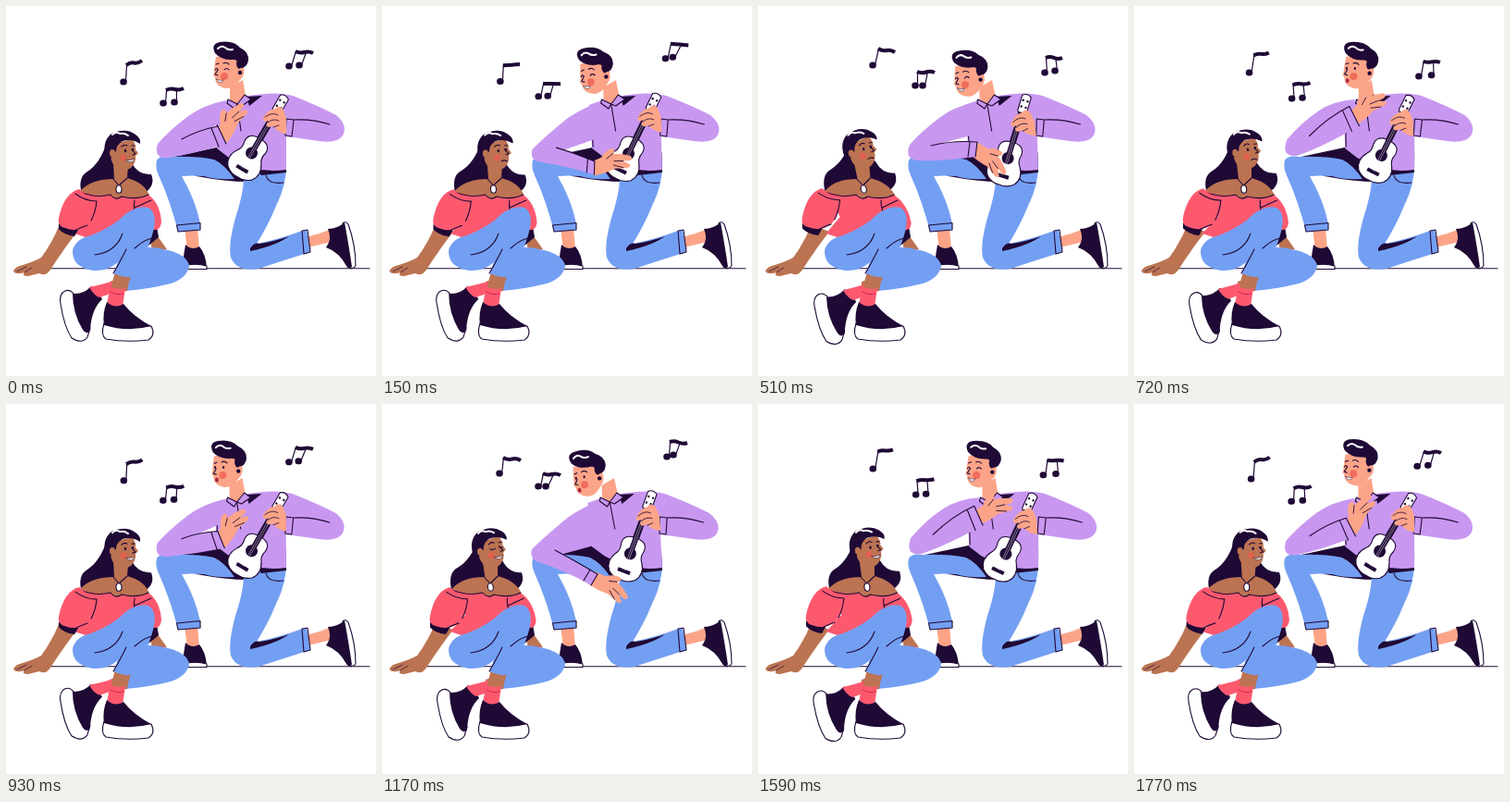
These frames come from a looping animation (400 px wide and 400 px high, 1800 ms). An HTML page:

```html
<!DOCTYPE html>
<html lang="en">
<head>
<meta charset="utf-8">
<title>Serenade</title>
<style>
  html, body { margin: 0; width: 100%; height: 100%; overflow: hidden; background: #fff; }
  svg { display: block; width: 100vw; height: 100vh; }
  .ink { fill: #1f0935; }
  .jean { fill: #739ff3; }
  .shirt { fill: #c898f0; }
  .top { fill: #fc596f; }
  .pale { fill: #fca488; }
  .tan { fill: #bb7352; }
  .white { fill: #fff; }
  .blush { fill: #ee5a4e; opacity: .75; }
  .line { fill: none; stroke: #1f0935; stroke-width: 1.1; stroke-linecap: round; stroke-linejoin: round; }
  .edge { stroke: #1f0935; stroke-width: 1.1; stroke-linejoin: round; }
  .shine { fill: none; stroke: #fff; stroke-width: 2; stroke-linecap: round; stroke-linejoin: round; }
</style>
</head>
<body>
<svg viewBox="0 0 400 400">
  <path class="line" d="M42 283.8H393"/>

  <!-- man: legs -->
  <path class="pale" d="M193 240L207 239L209 264L196 264Z"/>
  <path class="ink" d="M194 258Q201 265 209 260Q216 268 217 283L190 283Z"/>
  <path class="white edge" d="M196 280Q207 278 217 281L217 284.500H197Z"/>
  <path class="pale" d="M324 250Q338 247 352 241L358 254Q345 256 327 261Z"/>
  <path class="white edge" d="M364 235Q367 232 370 236Q378 258 378 281Q375 285 371 283Z"/>
  <path class="ink" d="M348 241Q358 241 366 234Q370 255 374 282Q370 285 368 281Q360 266 346 261Q353 252 348 241Z"/>
  <path class="ink" d="M176 164L232 152L258 170L262 190Q238 190 206 184Z"/>
  <path class="jean" d="M163 167Q166 161 178 163Q206 162 225 166Q236 171 247 187Q228 188 214 184Q199 183 190 184Q205 210 210 235V242L186 244Q178 212 165 183Q161 174 163 167Z"/>
  <path class="line" d="M184.500 237L210 234.500V242L186 244Z"/>
  <path class="jean" d="M246 164L303 172Q303 194 292 216Q283 238 271 257Q296 252 320 243L325 242L329 266Q300 275 273 284Q250 288 243 272Q240 258 248 229Q256 205 257 188Z"/>
  <path class="ink" d="M264 262Q269 255 274 257Q292 254 306 249Q292 259 264 265Z"/>
  <path class="line" d="M320 243L326 242L329 266L322 268ZM281 183Q283 193 300 191"/>

  <!-- man: torso and fretting arm -->
  <g id="chest">
    <path class="ink" d="M270 176L303 158L303 180L276 183Z"/>
    <path class="shirt" d="M240 102L262 97Q292 92 310 97Q338 108 357 118Q370 129 364 140Q358 149 338 146L303 141L303 177Q270 182 241 164L228 154L226 107Z"/>
    <path class="ink" d="M260 98L277 97L263 108Z"/>
    <path class="line" d="M303 122L302 140L309 141L311 123ZM311 123Q332 122 350 128M250 106L254 135M228 112L229 152"/>
    <path class="pale" d="M242 88L256 80L259 97L250 107L242 101Z" id="neck"/>
    <path class="shirt edge" d="M240 101L250 106L247 111L239 105ZM250 106L258 96L265 101L255 108Z"/>
  </g>

  <g id="guitar">
    <path class="white edge" d="M-3 -32V-64L-5 -67L-5 -84Q0 -88 5 -84L5 -67L3 -64V-32Q14 -31 13 -21Q11 -14 15 -9Q22 2 15 11Q8 17 0 16Q-8 17 -15 11Q-22 2 -15 -9Q-11 -14 -13 -21Q-14 -31 -3 -32Z"/>
    <circle class="ink" cy="-14" r="6.500"/>
    <path class="ink" d="M-3 -14V-66H3V-14ZM-7 4H7V8H-7Z"/>
    <path d="M-1 5V-64M1 5V-64" fill="none" stroke="#fff" stroke-width=".4"/>
    <path class="line" stroke-width="2" d="M-2.500 -72v.1M2.500 -72v.1M-2.500 -79v.1M2.500 -79v.1" style="stroke-width:2.400"/>
  </g>
  <g id="fret">
    <path class="pale" d="M303 122L300 112Q295 106 291 111Q284 112 279 119Q276 123 280 125L284 124Q279 129 284 131L289 130Q294 137 303 138Z"/>
    <path class="line" d="M280 120Q288 114 294 118M283 126Q289 121 295 124M289 131L295 129" style="stroke-width:.8"/>
  </g>

  <!-- man: strumming arm -->
  <g id="hand">
    <path class="pale" d="M-4 -7L10 -8Q16 -14 24 -14Q28 -11 23 -8L31 -5L40 0Q43 4 38 5L31 3L37 9Q36 13 31 11L20 8Q10 10 -4 8Z"/>
    <path class="line" d="M23 -8L15 -5M31 3L22 0M29 10L20 4" style="stroke-width:.8"/>
  </g>
  <path id="arm" class="shirt"/>
  <path id="crease" class="line"/>

  <g id="head">
    <path class="pale" d="M227 55Q225 66 225 72L224 75L226 77Q226 87 238 89Q246 90 253 80Q259 75 257 66L250 54Z"/>
    <path class="ink" d="M226 51Q221 41 231 39Q246 37 253 45Q263 50 262 59Q260 67 254 67Q250 70 249 62Q251 58 246 58Q233 59 226 51Z"/>
    <circle class="ink" cx="253" cy="72" r="2.200"/>
    <path class="shine" d="M229 46Q233 42 237 45Q240 48 245 47"/>
    <circle class="blush" cx="236" cy="76" r="4"/>
    <path class="line" d="M227 63L230 62M235 62Q238 60 241 63M229 69L226 74L229 75"/>
    <g id="grin">
      <path class="line" d="M226 69Q228 66 229 69M236 69Q238 66 241 69"/>
      <path class="white edge" d="M227 79Q231 81 235 80Q232 86 227 79Z" style="stroke-width:.5"/>
    </g>
    <g id="sing">
      <path class="line" d="M228 67v1M237 67v1" style="stroke-width:2"/>
      <ellipse cx="229.500" cy="81" rx="2" ry="2.500" fill="#a92b45"/>
    </g>
  </g>

  <!-- woman: arms and back hair -->
  <path class="tan" d="M58 236L77 244Q63 262 48 285Q43 293 36 289L24 292Q16 292 20 288Q11 291 8 287Q9 282 18 280Q31 276 38 272Q50 256 58 236Z"/>
  <path class="line" d="M20 288L28 283M12 287L22 282" style="stroke-width:.7"/>
  <path class="tan" d="M156 252L164 249L174 263L158 265Z"/>
  <path class="ink" d="M153 243L163 238L165 250L154 259Z"/>
  <g id="backHair">
    <path class="ink" d="M109 147Q102 170 88 179Q77 185 82 204Q110 198 122 192Q130 203 150 202Q162 194 157 182Q143 183 136 170Z"/>
  </g>

  <!-- woman: torso -->
  <g id="bust">
    <path class="tan" d="M116 170L132 172L131 186Q150 191 155 205L150 214L90 214L80 200Q92 187 117 187Z"/>
    <path class="top" d="M81 200Q96 207 113 204Q118 211 125 206Q142 210 154 204Q167 214 168 234Q166 246 155 240L148 228L110 258L74 246L92 228Z"/>
    <path class="line" d="M80 201Q97 208 113 204Q118 211 125 206Q142 210 154 204M139 210Q138 215 139 222M139 218Q148 214 157 210M116 187L122 194L131 186"/>
    <ellipse class="white edge" cx="122" cy="198" rx="3" ry="4.300"/>
  </g>
  <g id="sleeve">
    <path class="ink" d="M57 235L78 242L74 249Q62 247 57 241Z"/>
    <path class="top" d="M79 198Q63 202 57 229Q55 238 64 240Q77 245 88 237Q98 228 98 209Q88 207 79 198Z"/>
    <path class="line" d="M75 203Q86 211 98 211Q97 222 92 232M76 242Q82 239 88 237"/>
  </g>

  <!-- woman: legs -->
  <path class="jean" d="M134 263Q155 258 175 264Q196 269 198 281Q196 294 178 300Q155 306 129 308L131 290Z"/>
  <path class="tan" d="M112 298L134 291L131 308L112 312Z"/>
  <g id="tap">
    <path class="white edge" d="M64 308Q57 311 59 322Q63 347 71 359Q82 366 88 358L91 348L73 311Q69 306 64 308Z"/>
    <path class="ink" d="M72 311Q84 312 92 303Q101 310 104 317Q92 328 91 351Q87 356 83 350Q72 332 72 311Z"/>
    <path class="top" d="M90 304Q104 301 117 297L119 309L101 315Q95 313 90 304Z"/>
  </g>
  <path class="tan" d="M118 287L137 288L129 308L113 306Z"/>
  <path class="top" d="M113 303Q121 308 129 305L126 325Q116 330 109 322Z"/>
  <path class="line" d="M113 309Q120 313 127 311" style="stroke:#d8314f"/>
  <path class="white edge" d="M106 343Q102 356 108 360Q130 364 154 361Q162 356 157 346Z"/>
  <path class="ink" d="M109 320Q118 328 127 322Q138 336 157 346Q132 353 106 345Q104 332 109 320Z"/>
  <path class="jean" d="M72 264Q76 251 92 248Q117 238 129 225Q143 215 154 218Q163 223 160 240Q155 263 137 293Q126 294 116 289L121 277Q110 287 94 286Q71 282 72 264Z"/>
  <path class="line" d="M130 263Q122 279 116 289M96 269Q119 266 126 246M139 262Q150 252 159 251"/>

  <g id="face">
    <path class="tan" d="M112 150Q111 166 118 174Q127 181 135 175Q141 169 140 162L143 159L140 155Q141 149 136 144Z"/>
    <path class="ink" d="M108 164Q103 147 114 138Q130 131 140 139Q146 143 145 149Q136 143 126 146Q119 150 119 157Q113 161 113 168Z"/>
    <ellipse class="tan" cx="115" cy="159" rx="3" ry="4"/>
    <path class="shine" d="M115 139Q119 135 123 138Q128 137 132 140"/>
    <circle class="blush" cx="127" cy="164" r="3.500"/>
    <path class="line" d="M125 152Q128 149 131 151M136 151L139 151M136 155L140 160L137 161"/>
    <path id="open" class="line" d="M129 156v1M137 155v1" style="stroke-width:2.300"/>
    <path id="shut" class="line" d="M126 157Q129 159 132 157M136 156Q138 158 140 156"/>
    <path id="smile" class="white edge" d="M129 166Q134 168 139 165Q136 172 129 166Z" style="stroke-width:.5"/>
    <path id="calm" class="line" d="M132 168Q135 166 138 168"/>
  </g>

  <g id="notes"></g>
</svg>
<script>
const LOOP = 1800, BEAT = 900, STEP = 30;
const $ = id => document.getElementById(id);

// Three poses within a beat, joined by one smooth harmonic swing.
const poseAt = [0, 270, 510];
const half = ms => Math.sin(Math.PI * ms / BEAT);
const weights = ms => poseAt.map((p, i) => poseAt.reduce(
  (w, q, j) => i === j ? w : w * half(ms - q) / half(p - q), 1));
const mix = (w, vals) => vals.reduce((sum, v, i) => sum + v * w[i], 0);
const mixList = (w, lists) => lists[0].map((_, i) => mix(w, lists.map(l => l[i])));

// id: [x, y, angle] for each pose, turning about a pivot
const rigid = {
  head: { pivot: [248, 88], poses: [[0, 0, 0], [-15, 9, -10], [-11, 8, -5]] },
  guitar: { pivot: [0, 0], poses: [[258.4, 171, 30.5], [263.6, 175, 20], [266, 178, 17]] },
  fret: { pivot: [292, 124], poses: [[0, 0, 0], [-3, 0, -6], [-4, 4, -8]] },
  hand: { pivot: [0, 0], poses: [[234, 140, -61], [230, 189, 27], [236, 155, 36]] },
  face: { pivot: [122, 178], poses: [[0, 0, 0], [-7, 0, -6], [-11, -1, -10]] },
  backHair: { pivot: [122, 180], poses: [[0, 0, 0], [-6, -1, 2], [-9, -2, 1]] },
  sleeve: { pivot: [80, 240], poses: [[0, 0, 0], [-5, 0, -1], [-9, -1, -1]] },
  tap: { pivot: [98, 310], poses: [[0, 0, 0], [1, 1, 0], [2, 3, -1]] }
};

// id: [hinge height, slant per pose]
const slant = { chest: [180, [0, .05, .03]], bust: [250, [0, .09, .15]] };

const morphs = {
  arm: [
    'M238 102Q213 107 197 119Q177 134 164 149Q159 166 176 164Q206 159 238 149L229 130Q212 133 200 141L229 128L230 110Z',
    'M234 105Q207 116 192 130Q172 147 162 157Q159 168 170 171Q200 181 226 196L233 184Q212 173 196 162L229 153L230 112Z',
    'M237 103Q211 109 196 121Q176 136 164 150Q158 165 172 167Q200 168 235 163L237 147Q215 146 196 149L230 140L230 112Z'
  ],
  crease: [
    'M190 144Q208 134 229 130L238 149M222 132L230 152',
    'M187 158Q208 169 233 184L226 196M225 179L218 191',
    'M187 151Q210 145 237 147L235 163M229 147L227 163'
  ]
};
const NUM = /-?\d+(\.\d+)?/g;
const numbers = Object.fromEntries(Object.entries(morphs).map(
  ([id, paths]) => [id, paths.map(p => p.match(NUM).map(Number))]));

// first head, second head, beam start, beam end, ripple
const notes = [
  { heads: 1, poses: [[127, 82, 0, 0, 130, 64, 147, 59, -2], [127, 75, 0, 0, 131, 58, 150, 61, 2], [124, 64, 0, 0, 130, 46, 148, 50, 2]] },
  { heads: 2, poses: [[170, 105, 182, 104, 173, 91, 192, 89, -2], [169, 89, 177, 89, 174, 75, 193, 77, 2], [170, 86, 178, 86, 172, 71, 191, 72, 2]] },
  { heads: 2, poses: [[306, 65, 317, 64, 313, 49, 332, 51, 2], [308, 57, 315, 55, 311, 41, 330, 42, -2], [310, 72, 321, 70, 311, 56, 329, 56, -2]] }
];
for (const note of notes) {
  note.lines = [7, 1.2, 4].map(width => {
    const path = document.createElementNS('http://www.w3.org/2000/svg', 'path');
    path.setAttribute('class', 'line');
    path.style.strokeWidth = width;
    if (width === 4) path.style.strokeLinecap = 'butt';
    return $('notes').appendChild(path);
  });
}

function drawNote(note, w) {
  const [x1, y1, x2, y2, ax, ay, bx, by, wave] = mixList(w, note.poses);
  const mx = (ax + bx) / 2, my = (ay + by) / 2;
  const sx = ax + (bx - ax) * .6, sy = ay + (by - ay) * .6;
  let dots = `M${x1 - .3} ${y1}h.6`, stems = `M${x1 + 2.5} ${y1}L${ax + .5} ${ay}`;
  if (note.heads > 1) {
    dots += `M${x2 - .3} ${y2}h.6`;
    stems += `M${x2 + 2.5} ${y2}L${sx} ${sy}`;
  }
  const beam = `M${ax} ${ay}Q${(ax + mx) / 2} ${(ay + my) / 2 + wave} ${mx} ${my}T${bx} ${by}`;
  [dots, stems, beam].forEach((d, i) => note.lines[i].setAttribute('d', d));
}

const show = (id, on) => { $(id).style.display = on ? '' : 'none'; };

function draw(ms) {
  const beat = ms % BEAT, w = weights(beat);
  for (const id in rigid) {
    const { pivot: [px, py], poses } = rigid[id];
    const [x, y, angle] = mixList(w, poses);
    $(id).setAttribute('transform', `translate(${x} ${y}) rotate(${angle} ${px} ${py})`);
  }
  for (const id in slant) {
    const [hinge, poses] = slant[id], k = mix(w, poses);
    $(id).setAttribute('transform', `matrix(1 0 ${k} 1 ${-k * hinge} 0)`);
  }
  for (const id in morphs) {
    const vals = mixList(w, numbers[id]);
    let i = 0;
    $(id).setAttribute('d', morphs[id][0].replace(NUM, () => vals[i++].toFixed(2)));
  }
  notes.forEach(note => drawNote(note, w));

  const singing = ms >= 630 && ms < 1590;
  const smiling = ms < 150 || ms >= 900;
  const blink = beat >= 210 && beat < 330;
  show('sing', singing);
  show('grin', !singing);
  show('smile', smiling);
  show('calm', !smiling);
  show('shut', blink);
  show('open', !blink);
}

const start = performance.now();
function tick() {
  const ms = (performance.now() - start) % LOOP;
  draw(Math.floor(ms / STEP) * STEP);
  requestAnimationFrame(tick);
}
tick();
</script>
</body>
</html>
```
